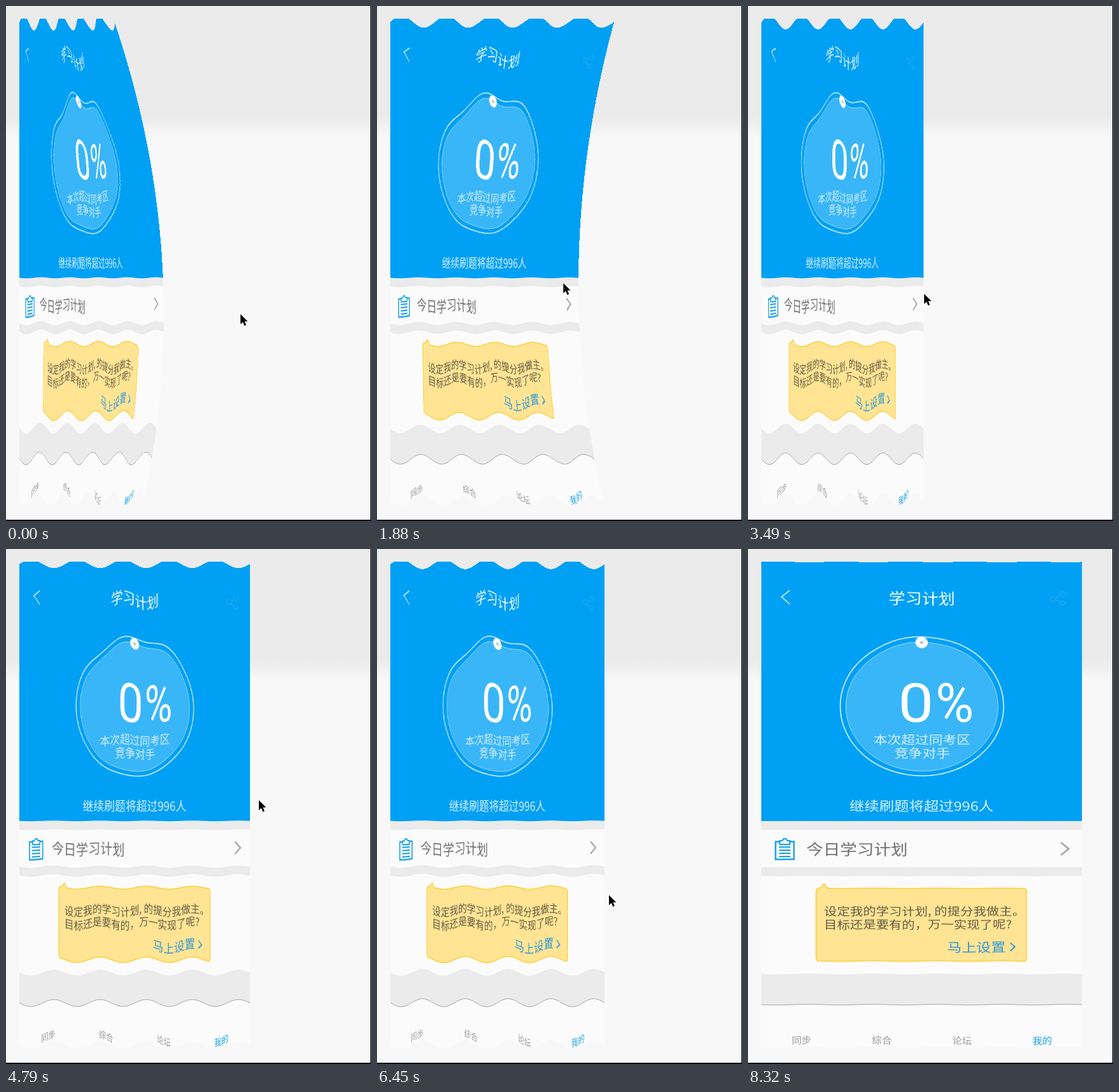
Write an HTML page with a canvas that moves like this. It is 576 by 814 pixels and loops after 9090 ms.

```html
<!DOCTYPE html>
<html lang="zh">
<head>
<meta charset="utf-8">
<title>学习计划</title>
<style>
html, body { margin: 0; width: 100%; height: 100%; overflow: hidden; background: #f8f8f8; }
canvas { display: block; }
</style>
</head>
<body>
<canvas id="stage" width="576" height="814"></canvas>
<script>
const LOOP = 9090, LEFT = 21, TOP = 20, W = 506, H = 768, REST = LEFT + W;
const BLUE = '#00a0f5', GREY = '#ebebeb', PAPER = '#fbfbfb';
const ctx = document.getElementById('stage').getContext('2d');

// start, end and number of picture changes in each burst
const BURSTS = [
  [90, 490, 7], [670, 1270, 10], [1420, 2300, 13], [2350, 3200, 13], [3260, 4120, 15],
  [4170, 4550, 7], [4790, 5690, 15], [5750, 6610, 16], [6670, 7560, 14], [7620, 8320, 11]
];

// time, edge x, edge speed (px/s), pointer lead, pointer y
const KEYS = [
  [0, 249, 670, 121, 487], [490, 453, 0, 2, 450], [670, 453, 0, 2, 450],
  [960, 330, 0, 0, 430], [1270, 453, 0, 2, 440], [1420, 453, 0, 2, 440],
  [1620, 495, 0, 4, 445], [1860, 318, -605, -24, 438], [1990, 275, 0, -4, 440],
  [2240, 540, 0, 0, 450], [2620, 290, 0, 0, 450], [2900, 475, 0, 2, 455],
  [3440, 277, 0, 1, 455], [3510, 277, 0, 1, 455], [3800, 380, 0, 2, 440],
  [4120, 300, 0, 0, 420], [4550, 382, 0, 2, 397], [4790, 385, 0, 14, 397],
  [5200, 460, 0, 2, 430], [5690, 385, 0, 2, 470], [5980, 300, 0, 0, 500],
  [6250, 385, 0, 3, 530], [6438, 359, 0, 7, 547], [6900, 523, 0, 2, 530],
  [7350, 381, 25, 0, 516], [7420, 383, 25, 0, 517], [7800, 515, 0, 5, 570],
  [8100, 538, 0, 10, 690], [8320, REST, 0, 60, 830]
];

function layer() {
  const c = document.createElement('canvas');
  c.width = W;
  c.height = H;
  return c;
}

function line(g, pts, color, width) {
  g.beginPath();
  pts.forEach(([x, y]) => g.lineTo(x, y));
  g.strokeStyle = color;
  g.lineWidth = width;
  g.stroke();
}

function oval(g, x, y, rx, ry, fill, stroke, width) {
  g.beginPath();
  g.ellipse(x, y, rx, ry, 0, 0, Math.PI * 2);
  if (fill) { g.fillStyle = fill; g.fill(); }
  if (stroke) { g.strokeStyle = stroke; g.lineWidth = width; g.stroke(); }
}

function band(g, y0, y1, color) {
  g.fillStyle = color;
  g.fillRect(LEFT, y0, W, y1 - y0);
}

function label(g, str, x, midY, size, color, stretch = 1.17, face = '"Noto Sans CJK SC", "Noto Sans CJK"') {
  g.save();
  g.translate(x, midY + size * 0.38);
  g.scale(stretch, 1);
  g.font = `${size}px ${face}, sans-serif`;
  g.fillStyle = color;
  g.fillText(str, 0, 0);
  g.restore();
}

function drawHeader(g) {
  band(g, 20, 430, BLUE);
  line(g, [[66, 65], [53, 76], [66, 87]], '#e8f6ff', 1.6);
  label(g, '学习计划', 222, 77, 22.4, '#fff');

  const faint = '#2cb0ea';
  line(g, [[492, 72], [485, 77]], faint, 1);
  line(g, [[486, 80], [492, 83]], faint, 1);
  oval(g, 497, 70, 5, 4.2, null, faint, 1);
  oval(g, 481, 79, 4.5, 3.6, null, faint, 1);
  oval(g, 496, 84, 4, 3, null, faint, 1);

  oval(g, 274.5, 248.5, 129, 110, null, '#e4f5ff', 1.6);
  oval(g, 274.5, 249, 120, 102, '#39b6f7', '#a6def9', 1);
  oval(g, 274, 147.5, 10, 9, '#fff');
  oval(g, 274, 147.5, 2.8, 2.3, '#b4c4cc');

  label(g, '0', 237, 241, 85, '#fff', 1.17, 'Roboto');
  label(g, '%', 296, 241, 85, '#fff', 0.97, 'Roboto');
  label(g, '本次超过同考区', 198, 301, 18.7, '#d8f0ff');
  label(g, '竞争对手', 231, 323, 18.8, '#d8f0ff');
  label(g, '继续刷题将超过996人', 160, 406, 20.1, '#dcf2ff');
}

function drawPlanRow(g) {
  band(g, 430, 444, GREY);
  band(g, 503, 517, GREY);
  g.strokeStyle = '#149fe8';
  g.lineWidth = 2.4;
  g.strokeRect(43.5, 462.5, 29, 28);
  g.fillStyle = PAPER;
  g.fillRect(49, 457, 18, 10);
  line(g, [[50, 467], [50, 461], [54, 461], [56, 458], [60, 458], [62, 461], [66, 461], [66, 467], [50, 467]], '#149fe8', 2.2);
  for (let y = 471; y <= 486; y += 5) line(g, [[49, y], [67, y]], '#149fe8', 2);
  label(g, '今日学习计划', 92, 474, 22.8, '#6c6c6c');
  line(g, [[494, 464], [506, 474], [494, 484]], '#a6a6a6', 2.8);
}

function drawBubble(g) {
  g.beginPath();
  g.moveTo(111, 536.5);
  [[114, 536], [120, 529.5], [126, 536.5]].forEach(([x, y]) => g.lineTo(x, y));
  g.arcTo(439.5, 536.5, 439.5, 651.5, 4);
  g.arcTo(439.5, 651.5, 107.5, 651.5, 4);
  g.arcTo(107.5, 651.5, 107.5, 536.5, 4);
  g.arcTo(107.5, 536.5, 111, 536.5, 4);
  g.closePath();
  g.fillStyle = '#ffe494';
  g.fill();
  g.strokeStyle = '#f8cf2e';
  g.lineWidth = 1.6;
  g.stroke();
  label(g, '设定我的学习计划, 的提分我做主。', 120, 572, 17.5, '#625b45');
  label(g, '目标还是要有的，万一实现了呢?', 120, 593, 17.5, '#625b45');
  label(g, '马上设置', 314, 629, 19.8, '#2b97dc');
  line(g, [[414, 623], [421, 629], [414, 636]], '#2b97dc', 2);
}

function drawTabs(g) {
  band(g, 672, 720, GREY);
  band(g, 720, 721, '#a8a8a8');
  ['同步', '综合', '论坛', '我的'].forEach((s, i) =>
    label(g, s, 69 + i * 126.6, 777, 13.3, i === 3 ? '#129fe6' : '#979797'));
}

function makePanel() {
  const c = layer(), g = c.getContext('2d');
  g.translate(-LEFT, -TOP);
  band(g, TOP, TOP + H, PAPER);
  drawHeader(g);
  drawPlanRow(g);
  drawBubble(g);
  drawTabs(g);
  return c;
}

const panel = makePanel(), folded = layer(), fold = folded.getContext('2d');

function stepTime(t) {
  let now = 0;
  for (const [start, end, steps] of BURSTS) {
    if (t < start) break;
    const gap = (end - start) / (steps - 1);
    now = start + gap * Math.min(steps - 1, Math.floor((t - start) / gap + 1e-6));
  }
  return now;
}

function pose(t) {
  let i = 0;
  while (i < KEYS.length - 2 && t >= KEYS[i + 1][0]) i++;
  const [t0, e0, v0, l0, y0] = KEYS[i], [t1, e1, v1, l1, y1] = KEYS[i + 1];
  const d = (t1 - t0) / 1000, p = Math.min(1, (t - t0) / (t1 - t0)), q = 1 - p;
  const ease = p * p * (3 - 2 * p);
  return {
    edge: e0 + (e1 - e0) * ease + d * p * q * (v0 * q - v1 * p),
    speed: (e1 - e0) * 6 * p * q / d + v0 * q * (1 - 3 * p) + v1 * p * (3 * p - 2),
    lead: l0 + (l1 - l0) * ease,
    y: y0 + (y1 - y0) * ease
  };
}

function drawBackdrop() {
  const g = ctx.createLinearGradient(0, 176, 0, 208);
  g.addColorStop(0, GREY);
  g.addColorStop(1, '#f8f8f8');
  ctx.fillStyle = g;
  ctx.fillRect(0, 0, 576, 814);
  ctx.fillStyle = '#000';
  ctx.fillRect(575, 0, 1, 814);
  ctx.fillRect(0, 812, 576, 2);
}

function drawCurtain({ edge, speed, y }) {
  // folds: every column is scaled about the middle height
  const depth = Math.max(0, 0.003 + 0.000164 * (REST - edge));
  fold.clearRect(0, 0, W, H);
  for (let x = 0; x < W; x++) {
    const s = 1 + depth * (0.65 * Math.sin(10 * Math.PI * (x + 0.5) / W) - 0.35);
    fold.drawImage(panel, x, 0, 1, H, x, H / 2 * (1 - s), 1, H * s);
  }
  // rows far from the pointer trail behind
  const lag = Math.max(-130, Math.min(130, -0.12 * speed));
  for (let r = 0; r < H; r++) {
    const d = (TOP + r - y) / 470;
    const w = Math.max(5, Math.round(edge - LEFT + lag * d * d));
    ctx.drawImage(folded, 0, r, W, 1, LEFT, TOP + r, w, 1);
  }
}

function drawPointer(x, y) {
  ctx.save();
  ctx.translate(x, y);
  ctx.beginPath();
  [[0, 0], [0, 16], [3.8, 12.6], [6.4, 18.4], [9, 17.2], [6.5, 11.6], [11.5, 11.4]]
    .forEach(([px, py]) => ctx.lineTo(px, py));
  ctx.closePath();
  ctx.strokeStyle = '#fff';
  ctx.lineWidth = 2;
  ctx.stroke();
  ctx.fillStyle = '#000';
  ctx.fill();
  ctx.restore();
}

let shown = -1;
function tick() {
  const t = stepTime(performance.now() % LOOP);
  if (t !== shown) {
    shown = t;
    const p = pose(t);
    drawBackdrop();
    drawCurtain(p);
    drawPointer(p.edge + p.lead, p.y);
  }
  requestAnimationFrame(tick);
}
tick();
</script>
</body>
</html>
```
